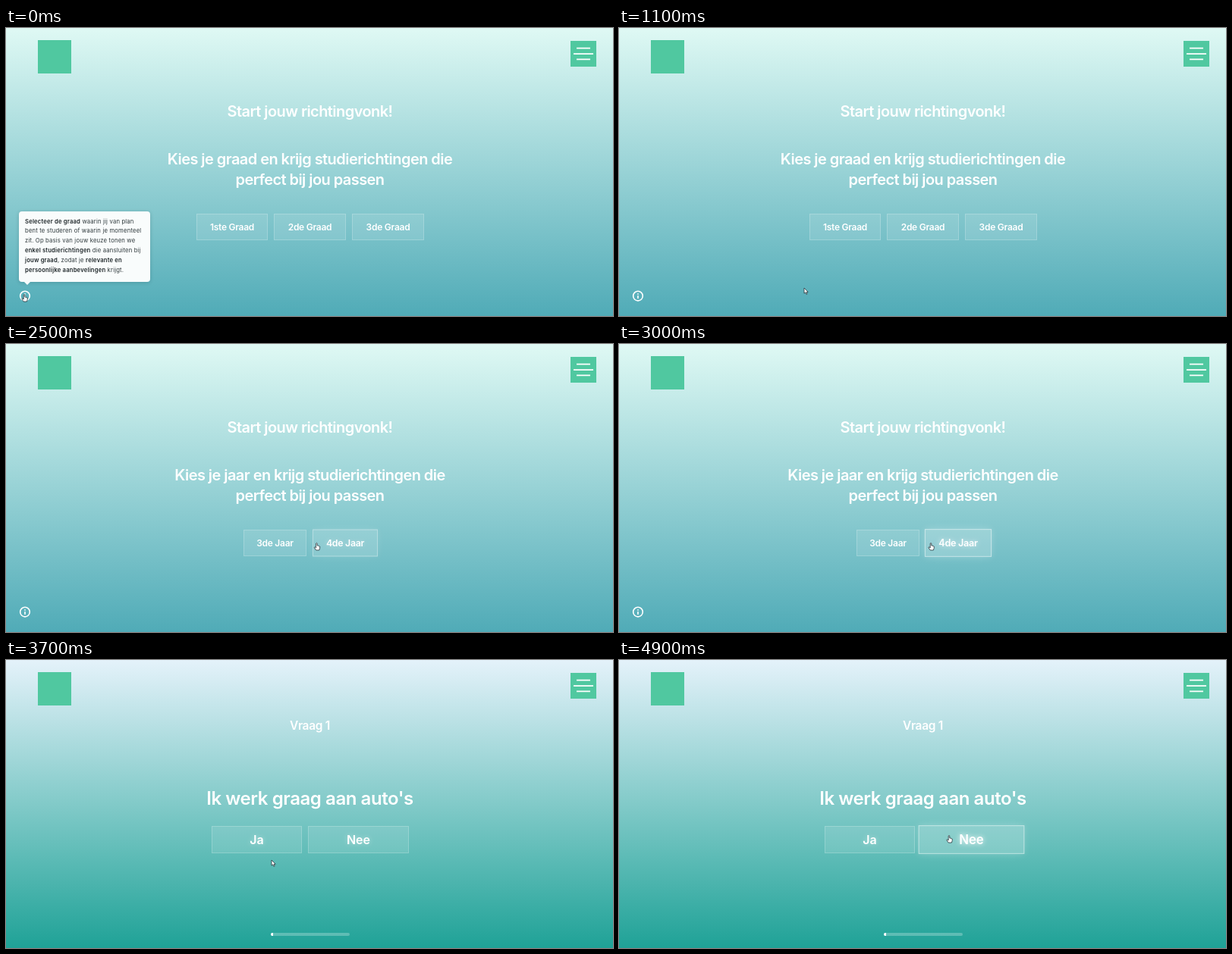
An HTML page that plays this animation: 800x380 px, repeating every 5000 ms.

```html
<!DOCTYPE html>
<html lang="nl">
<head>
<meta charset="utf-8">
<title>Studiekeuze</title>
<style>
html, body { margin: 0; width: 100%; height: 100%; overflow: hidden; }
#stage {
  position: relative; width: 800px; height: 380px; overflow: hidden;
  font-family: Inter, "Open Sans", sans-serif; font-weight: 600; color: #fff;
  background: linear-gradient(#dff9f4, #50abb7);
}
#stage.quiz { background: linear-gradient(#e4f2fa, #1fa297); }
#stage > *, .page > * { position: absolute; }
.page { inset: 0; }
.logo { left: 42px; top: 16px; width: 44px; height: 44px; background: #50c8a0; }
svg { left: 0; top: 0; overflow: visible; }
.head {
  left: 0; width: 801px; text-align: center; white-space: pre;
  font-size: 20px; line-height: 27px; letter-spacing: -.028em;
}
.head.small { font-size: 15.5px; letter-spacing: -.02em; }
.head.big { font-size: 24px; letter-spacing: -.018em; }
.btn {
  --h: 0;
  box-sizing: border-box; display: flex; align-items: center; justify-content: center;
  font-size: 12px; letter-spacing: -.022em; white-space: nowrap;
  border: 1px solid rgba(255, 255, 255, calc(.2 + .25 * var(--h)));
  background: rgba(255, 255, 255, calc(.1 + .1 * var(--h)));
  box-shadow: 0 0 9px rgba(255, 255, 255, calc(.24 * var(--h)));
  text-shadow: 0 0 7px rgba(255, 255, 255, calc(var(--glow, 0) + .65 * var(--h)));
  transform: scale(calc(1 + .05 * var(--h)));
}
.btn.large { --glow: .4; font-size: 16px; letter-spacing: 0; }
.bar { left: 349px; top: 360px; width: 104px; height: 4px; border-radius: 2px; background: rgba(255, 255, 255, .25); overflow: hidden; }
.bar::before { content: ""; display: block; width: 2.5px; height: 4px; background: #fff; }
#tip {
  left: 17px; top: 242px; width: 173px; height: 93px; border-radius: 4px;
  background: #f9fcfc; box-shadow: 0 1px 5px rgba(0, 40, 50, .2);
  color: #303a3d; font-size: 7.7px; font-weight: 400; letter-spacing: .17px;
}
#tip p { position: absolute; left: 8px; top: 7.6px; margin: 0; line-height: 12.8px; white-space: nowrap; }
#tip b { font-weight: 600; color: #20282b; }
#tip::after {
  content: ""; position: absolute; left: 7px; top: 93px;
  border: solid transparent; border-width: 4px 4.5px 0; border-top-color: #f9fcfc;
}
</style>
</head>
<body>
<div id="stage">
  <div class="logo"></div>
  <svg width="800" height="380" fill="none" stroke="#fff">
    <path d="M744 17h34v34h-34z" fill="#50c8a0" stroke="none"/>
    <path d="M752 26.7h18M748 34.2h26M752 41.4h18" stroke-width="1.7"/>
    <g id="info">
      <circle cx="25" cy="353.6" r="6.3" stroke-width="1.6"/>
      <path d="M25 353v4M25 350.2v1.5" stroke-width="1.6"/>
    </g>
  </svg>
  <div id="tip"><p><b>Selecteer de graad</b> waarin jij van plan<br>bent te studeren of waarin je momenteel<br>zit. Op basis van jouw keuze tonen we<br><b>enkel studierichtingen</b> die aansluiten bij<br><b>jouw graad</b>, zodat je <b>relevante en</b><br><b>persoonlijke aanbevelingen</b> krijgt.</p></div>
  <div id="pages"></div>
  <svg id="cursor" width="12" height="14" fill="#fff" stroke="#26343a" stroke-width=".8" stroke-linejoin="round">
    <path id="arrow" d="M0 0V7.2L1.7 5.8L2.9 8.4L4.1 7.9L3 5.3H5.2Z"/>
    <path id="hand" d="M.2 1Q1-.3 1.8 1V4L3 4.1L4.2 4.5L5.2 5V7.5L4.4 10H.2L-2 6.8Q-2.2 5.7-1.2 5.8L.2 7Z"/>
  </svg>
</div>
<script>
const LOOP = 5000, STEP = 100;
const $ = id => document.getElementById(id);
const start = 'Start jouw richtingvonk!';
const ask = what => `Kies je ${what} en krijg studierichtingen die\nperfect bij jou passen`;

// heads: text, centre of first line, class; buttons: label, x, y, width, height
const pages = [
  { from: 0, heads: [[start, 110.2], [ask('graad'), 173.7]],
    buttons: [['1ste Graad', 251, 245, 94, 35], ['2de Graad', 353, 245, 95, 35], ['3de Graad', 456, 245, 95, 35]] },
  { from: 2500, heads: [[start, 110.2], [ask('jaar'), 173.7]],
    buttons: [['3de Jaar', 313, 245, 83, 35], ['4de Jaar', 405, 245, 84, 35]] },
  { from: 3700, quiz: true, heads: [['Vraag 1', 86.4, 'small'], ["Ik werk graag aan auto's", 182.4, 'big']],
    buttons: [['Ja', 271, 219, 119, 36], ['Nee', 398, 219, 133, 36]] }
];

// time, x, y of the pointer's hot spot
const path = [
  [0, 23, 351], [500, 23, 351], [800, 140, 354], [1000, 238, 345], [1100, 244, 343],
  [1200, 262, 335], [1600, 405, 263], [2000, 407, 262], [2400, 408, 262], [2900, 410, 262],
  [3200, 410, 262], [3300, 408, 262], [3400, 402, 263], [3500, 398, 263], [3600, 350, 263],
  [3700, 350, 264], [3900, 350, 264], [4100, 342, 237], [4300, 345, 234],
  [4600, 425, 231], [4800, 434, 231], [5000, 434, 231]
];

const clamp = v => Math.max(0, Math.min(1, v));

function add(parent, cls, text, style) {
  const el = document.createElement('div');
  el.className = cls;
  el.textContent = text;
  Object.assign(el.style, style);
  parent.append(el);
  return el;
}

for (const page of pages) {
  page.el = add($('pages'), 'page', '', {});
  for (const [text, y, cls = ''] of page.heads)
    add(page.el, 'head ' + cls, text, { top: y - 13.5 + 'px' });
  page.els = page.buttons.map(([label, x, y, w, h]) =>
    add(page.el, page.quiz ? 'btn large' : 'btn', label,
      { left: x + 'px', top: y + 'px', width: w + 'px', height: h + 'px' }));
  if (page.quiz) add(page.el, 'bar', '', {});
}

function pointer(t) {
  const i = path.findIndex(k => k[0] > t);
  const [t0, x0, y0] = path[i - 1], [t1, x1, y1] = path[i];
  const p = (t - t0) / (t1 - t0);
  return [x0 + (x1 - x0) * p, y0 + (y1 - y0) * p];
}

const pageAt = t => pages.findLast(p => t >= p.from);

const inside = ([px, py], [, x, y, w, h]) => px >= x && px < x + w && py >= y && py < y + h;

// hover strength rises or falls by half each step
function hover(page, button, t) {
  let level = 0;
  for (let s = page.from; s <= t; s += STEP)
    level = clamp(level + (inside(pointer(s), button) ? .5 : -.5));
  return level;
}

function draw(time) {
  const t = Math.floor(time % LOOP / STEP) * STEP;
  const page = pageAt(t), at = pointer(t);
  $('stage').className = page.quiz ? 'quiz' : '';
  for (const p of pages) p.el.style.display = p === page ? '' : 'none';
  page.buttons.forEach((b, i) => page.els[i].style.setProperty('--h', hover(page, b, t)));

  $('info').style.display = page.quiz ? 'none' : '';
  $('tip').style.opacity = clamp((900 - t) / 300);

  const onInfo = !page.quiz && Math.hypot(at[0] - 25, at[1] - 353.6) < 8;
  const link = onInfo || page.buttons.some(b => inside(at, b));
  $('hand').style.display = link ? '' : 'none';
  $('arrow').style.display = link ? 'none' : '';
  $('cursor').style.transform = `translate(${at[0]}px, ${at[1]}px)`;
}

function tick() {
  draw(performance.now());
  requestAnimationFrame(tick);
}
tick();
</script>
</body>
</html>
```
